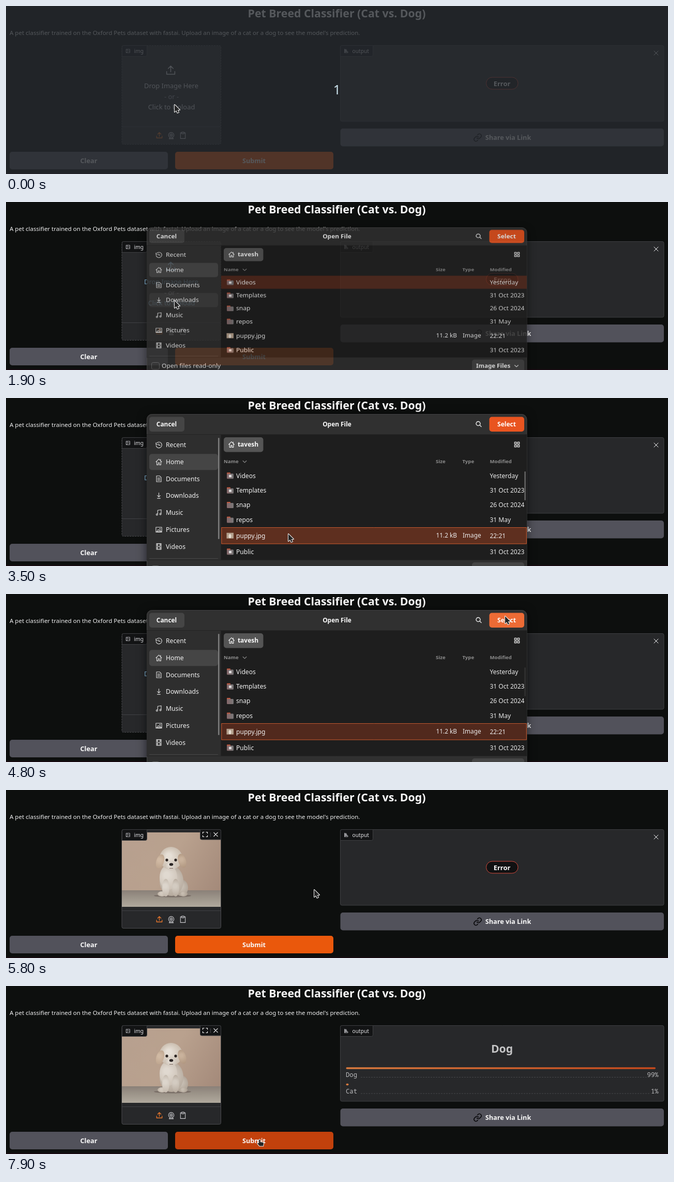
Recreate the animation shown at these times as an HTML page with a canvas. Size 1280 by 325 pixels, loop 8 s.

```html
<!DOCTYPE html>
<html lang="en">
<head>
<meta charset="utf-8">
<title>Pet Breed Classifier</title>
<style>
html, body { margin: 0; width: 100%; height: 100%; overflow: hidden; background: #0d0f0e; }
canvas { display: block; }
</style>
</head>
<body>
<canvas id="stage" width="1280" height="325"></canvas>
<script>
const LOOP = 8000, TICK = 100;
const screen2d = document.getElementById('stage').getContext('2d');
const sheet = document.createElement('canvas');
sheet.width = 1280;
sheet.height = 400;
const sheet2d = sheet.getContext('2d');
let g = screen2d;

const SANS = '"Noto Sans", "Open Sans", sans-serif';
const MONO = '"Noto Sans Mono", "DejaVu Sans Mono", monospace';

// Icons on a 24 unit grid
const ICON = {
  upload: 'M3 15v6h18v-6M12 16V3M6.5 8.5L12 3l5.5 5.5',
  webcam: 'M12 2a9 9 0 1 0 .01 0M12 6.5a4.5 4.5 0 1 0 .01 0M12 10a1 1 0 1 0 .01 0M8 19l-3 4h14l-3-4',
  clipboard: 'M8 4H4v19h16V4h-4M8 2h8v5H8z',
  image: 'M3 3h18v18H3zM8 7a1.6 1.6 0 1 0 .01 0M4 20L15 10l6 6',
  chart: 'M3 2v20M6 4h6v4H6zM6 10h9v4H6zM6 16h14v5H6z',
  close: 'M4 4L20 20M20 4L4 20',
  link: 'M10 13a5 5 0 0 0 7.5.5l3-3a5 5 0 0 0-7-7l-1.8 1.7M14 11a5 5 0 0 0-7.5-.5l-3 3a5 5 0 0 0 7 7l1.7-1.7',
  expand: 'M8 3H3v5M16 3h5v5M21 16v5h-5M8 21H3v-5',
  clock: 'M5 5a10 10 0 1 1-2.5 9M2 4v6h6M12 7v6h5',
  home: 'M2 12L12 2l10 10M5 10v12h5v-7h4v7h5V10M18 7V3',
  page: 'M4 2h11l5 5v15H4zM8 9h8M8 13h8M8 17h8',
  down: 'M12 2v14M7 11l5 5 5-5M7 21h10',
  music: 'M8 18V4l12-2v14M5.5 16a2.6 2.6 0 1 0 .01 0M17.5 14a2.6 2.6 0 1 0 .01 0',
  picture: 'M2 4h20v17H2zM5 19l5-7 3 4 3-3 4 6zM16 7.5a1 1 0 1 0 .01 0',
  film: 'M4 2h16v20H4zM8 2v20M16 2v20M8 12h8M4 7h4M4 17h4M16 7h4M16 17h4',
  search: 'M10 2a8 8 0 1 0 .01 0M16 16l6 6',
  grid: 'M3 3h7v7H3zM14 3h7v7h-7zM3 14h7v7H3zM14 14h7v7h-7z',
  chevron: 'M3 8l9 9 9-9'
};
for (const name in ICON) ICON[name] = new Path2D(ICON[name]);

const ARROW = new Path2D('M0 0V14L3.2 11L5.5 15.8L8 14.7L5.8 9.9H10Z');
const HAND = new Path2D('M1 2Q2.3.2 3.6 2V5.8L8.8 6.7Q10.2 7 10 8.8L9.2 13.6H2.3L-2 8.5Q-1.6 7 1 8.2Z');

const SIDEBAR = [['Recent', 'clock'], ['Home', 'home'], ['Documents', 'page'],
  ['Downloads', 'down'], ['Music', 'music'], ['Pictures', 'picture'], ['Videos', 'film']];
const FILES = [['Videos', 'Yesterday'], ['Templates', '31 Oct 2023'], ['snap', '26 Oct 2024'],
  ['repos', '31 May'], ['puppy.jpg', '22:21'], ['Public', '31 Oct 2023']];
const ROW_EDGE = [136, 164.5, 193, 221, 250, 282.5, 312];
const PUPPY = 4;

// Pointer path: time, x, y
const PATH = [[2300, 326, 191], [3200, 548, 261], [3300, 546, 263], [3800, 546, 263],
  [4700, 963, 47], [4800, 965, 43], [5600, 965, 43], [5700, 790, 110], [5800, 596, 193],
  [5900, 595, 195], [6100, 595, 195], [6700, 488, 296]];

function pointerAt(t) {
  const next = PATH.findIndex(p => p[0] > t);
  if (next === 0) return PATH[0].slice(1);
  if (next < 0) return PATH[PATH.length - 1].slice(1);
  const a = PATH[next - 1], b = PATH[next];
  let k = (t - a[0]) / (b[0] - a[0]);
  if (b[0] - a[0] > 400) k = k * k * (3 - 2 * k);
  return [a[1] + (b[1] - a[1]) * k, a[2] + (b[2] - a[2]) * k];
}

function rect(x, y, w, h, fill) {
  g.fillStyle = fill;
  g.fillRect(x, y, w, h);
}

function box(x, y, w, h, r, fill, stroke, dash = []) {
  g.beginPath();
  g.roundRect(x, y, w, h, r);
  if (fill) { g.fillStyle = fill; g.fill(); }
  if (stroke) {
    g.strokeStyle = stroke;
    g.lineWidth = 1;
    g.setLineDash(dash);
    g.stroke();
    g.setLineDash([]);
  }
}

function line(x1, y1, x2, y2, color, dash = []) {
  g.beginPath();
  g.moveTo(x1, y1);
  g.lineTo(x2, y2);
  g.strokeStyle = color;
  g.lineWidth = 1;
  g.setLineDash(dash);
  g.stroke();
  g.setLineDash([]);
}

// y is the middle of the capital letters
function text(s, x, y, size, color, { weight = 400, align = 'left', family = SANS } = {}) {
  g.font = `${weight} ${size}px ${family}`;
  g.textAlign = align;
  g.fillStyle = color;
  g.fillText(s, x, y + size * 0.357);
}

const bold = (s, x, y, size, color, align = 'center') => text(s, x, y, size, color, { weight: 700, align });

function icon(name, x, y, size, color, weight = 1.1) {
  const k = size / 24;
  g.save();
  g.translate(x - size / 2, y - size / 2);
  g.scale(k, k);
  g.strokeStyle = color;
  g.lineWidth = weight / k;
  g.lineCap = g.lineJoin = 'round';
  g.stroke(ICON[name]);
  g.restore();
}

function oval(x, y, rx, ry, fill, turn = 0) {
  g.beginPath();
  g.ellipse(x, y, rx, ry, turn, 0, Math.PI * 2);
  g.fillStyle = fill;
  g.fill();
}

// Oval shaded from a lit spot at its upper left to a darker rim
function fur(x, y, rx, ry, light, dark, turn = 0) {
  const r = Math.max(rx, ry);
  const fill = g.createRadialGradient(x - rx * .25, y - ry * .25, 0, x, y, r * 1.05);
  fill.addColorStop(.2, light);
  fill.addColorStop(1, dark);
  oval(x, y, rx, ry, fill, turn);
}

function gradient(x1, y1, x2, y2, ...colors) {
  const fill = g.createLinearGradient(x1, y1, x2, y2);
  colors.forEach((c, i) => fill.addColorStop(i / (colors.length - 1), c));
  return fill;
}

function chip(x, w, name, label) {
  box(x + .5, 76.5, w, 21, [3, 0, 3, 0], '#131415', '#3f4043');
  icon(name, x + 12, 87, 9, '#bcbcc0', .9);
  text(label, x + 23.5, 87, 10.2, '#e4e4e7');
}

function drawPhoto() {
  rect(224, 82, 191, 144, gradient(224, 82, 415, 190, '#b7a08f', '#b9a18e', '#a48a7a'));
  rect(224, 194, 191, 32, gradient(0, 194, 0, 226, '#8a8078', '#9e968b', '#b0a99d'));
  oval(322, 204.5, 36, 3, '#7b7068');
  fur(339, 189, 13, 16, '#cbc2b7', '#ab9f92');
  fur(320, 176, 23, 29, '#d6cec4', '#b3a79a');
  fur(314, 169, 17, 24, '#e0d9d0', '#cbc0b4');
  fur(302, 201, 9, 5, '#d3cabf', '#b9ad9f');
  fur(343, 201, 8, 5, '#c6bcb0', '#a99d90');
  fur(309, 189, 7, 17, '#dcd5cc', '#c3b8ac');
  fur(328, 189, 7, 17, '#d3cbc1', '#b6aa9d');
  fur(319, 132, 22, 22, '#e6dfd6', '#c9bcad');
  fur(298, 138, 7.5, 14, '#d0b9a3', '#bda48d', .3);
  fur(340.5, 137, 7.5, 14, '#c9b29c', '#b0967f', -.3);
  fur(319, 146, 11, 9, '#e4ddd4', '#cbc1b5');
  oval(311, 135.5, 2.6, 2.7, '#2c2522');
  oval(328, 135.5, 2.6, 2.7, '#2c2522');
  oval(319.5, 144, 3.8, 2.8, '#2b2524');
  line(316, 151.5, 323, 151.5, '#7a675f');
}

function drawImagePanel(t) {
  const loaded = t >= 5700;
  box(224, 76.5, 191.5, 191, 3, '#27282a', '#4a4b4e', loaded ? [] : [3, 2]);
  line(224, 233.5, 415, 233.5, '#404144');
  if (loaded) {
    drawPhoto();
    box(375.5, 76.5, 40, 19.5, [0, 3, 0, 3], '#131415', '#3f4043');
    icon('expand', 385, 86, 12, '#f4f4f5', 1.2);
    line(395.5, 82, 395.5, 91, '#45464a');
    icon('close', 405.5, 86, 11, '#f4f4f5', 1.2);
  } else {
    const color = t >= 1900 && t < 5400 ? '#8ec8ee' : '#e4e4e7';
    icon('upload', 318.5, 124, 21, color, 1.5);
    text('Drop Image Here', 319.5, 154, 12.9, color, { align: 'center' });
    text('- or -', 320, 175, 12.9, '#a1a1aa', { align: 'center' });
    text('Click to Upload', 320, 195.5, 12.9, color, { align: 'center' });
  }
  icon('upload', 296.5, 250, 14, '#e8762c', 1.3);
  icon('webcam', 319.5, 250.5, 14, '#c8c8cc');
  icon('clipboard', 342, 250, 14, '#c8c8cc');
  chip(224, 48, 'image', 'img');
}

function drawScore(label, value, y, right) {
  box(657.5, y - 14.7, right - 657.5, 3.4, 1.7, gradient(658, 0, 1256, 0, '#d97a3e', '#c5491c'));
  text(label, 657, y, 12.2, '#bcbcbe', { family: MONO });
  text(value, 1261.5, y, 12.2, '#bcbcbe', { family: MONO, align: 'right' });
  line(686, y + 4.5, 1261 - value.length * 7.4, y + 4.5, '#46474a', [3, 2]);
}

function drawOutputPanel(t) {
  box(646.5, 76.5, 625.5, 146.5, 3, '#27282a', '#3f4043');
  chip(646, 63, 'chart', 'output');
  if (t < 7200) {
    icon('close', 1257, 91, 12, '#f4f4f5', 1);
    box(928.5, 138, 61.5, 23, 11.5, '#101112', '#d24a3c');
    bold('Error', 959, 150, 12.9, '#fafafa');
    return;
  }
  g.globalAlpha = Math.min(1, (t - 7100) / 800);
  bold('Dog', 959, 121.5, 21.2, '#c4c4c5');
  drawScore('Dog', '99%', 172, 1256);
  drawScore('Cat', '1%', 203.5, 662.5);
  g.globalAlpha = 1;
}

function drawPage(t, overSubmit) {
  rect(0, 0, 1280, 325, '#0d0f0e');
  rect(0, 323, 1280, 2, '#170b11');
  bold('Pet Breed Classifier (Cat vs. Dog)', 639.5, 14, 21.3, '#fafafa');
  text("A pet classifier trained on the Oxford Pets dataset with fastai. Upload an image of a cat or a dog to see the model's prediction.",
    7, 51.5, 11.5, '#f0f0f1');
  drawImagePanel(t);
  drawOutputPanel(t);
  box(646.5, 237, 625.5, 34.5, 5, '#52525b');
  icon('link', 912, 254.5, 18, '#09090b', 1.6);
  bold('Share via Link', 971, 254.5, 12.7, '#fafafa');
  box(7, 282, 306, 34, 5, '#52525b');
  bold('Clear', 160, 299.5, 12.8, '#fafafa');
  box(327, 282, 306, 34, 5, overSubmit ? '#c2410c' : '#ea580c');
  bold('Submit', 479.5, 299.5, 12.7, '#fafafa');
}

function drawFolder(index, y) {
  if (index === PUPPY) {
    rect(426.5, y - 5.5, 13.5, 11, '#b39f8c');
    oval(433, y + 1, 2.5, 4, '#e6ddd2');
    return;
  }
  box(427, y - 6, 7, 5, 1, '#c2583f');
  box(427, y - 4, 13, 10, 1.5, gradient(427, 0, 440, 0, '#85686a', '#777677'));
  if (index < 2 || index === 5) rect(431, y - 1.5, 5, 4.5, '#dedede');
}

function drawSidebar(t, hovered) {
  rect(272, 71, 143.5, 242, '#2e2e2e');
  SIDEBAR.forEach(([label, name], i) => {
    const y = 91 + i * 32.7;
    if (i === 1) box(277, y - 15.5, 133, 31, 5, '#454545');
    else if (i === hovered) box(277, y - 15.5, 133, 31, 5, '#3a3a3a');
    icon(name, 295.5, y, 13.5, '#dcdcdc');
    text(label, 309, y, 12.2, '#f2f2f2');
  });
  line(277, 310.5, 410, 310.5, '#484848');
  if (t >= 2200) box(410, 77, 2.6, 196, 1.3, '#7b7b7b');
  line(415.5, 71, 415.5, 313, '#262626');
}

function drawFiles(t, x, y) {
  const selected = t < 3400 ? 0 : PUPPY;
  const inList = x > 416 && x < 1007 && y > ROW_EDGE[0];
  FILES.forEach(([name, date], i) => {
    const top = ROW_EDGE[i], height = ROW_EDGE[i + 1] - top, mid = top + height / 2;
    const hover = inList && y >= top && y < top + height;
    if (i === selected) rect(416, top, 591, height, hover ? '#5e2f1f' : '#51291d');
    else if (hover) rect(416, top, 591, height, '#2b2b2b');
    if (i === selected && i === PUPPY) box(416.8, top + .5, 589.5, height - 1, 0, null, '#c1582f');
    drawFolder(i, mid);
    text(name, 445, mid, 12.1, '#f2f2f2');
    text(date, 935.5, mid, 12, '#ececec');
    if (i === PUPPY) {
      text('11.2 kB', 872, mid, 11.8, '#ececec', { align: 'right' });
      text('Image', 883, mid, 11.8, '#ececec');
    }
  });
  if (x > 416) box(1002.5, 142, 2.2, 56, 1.1, t < 4500 ? '#6f6f6f' : '#353535');
}

function drawDialog(t, x, y) {
  const onSelect = x > 934 && y < 65;
  g.clearRect(0, 0, 1280, 400);
  g.save();
  g.shadowColor = 'rgba(0,0,0,.6)';
  g.shadowBlur = 18;
  g.shadowOffsetY = 3;
  box(272, 31, 735, 330, 10, '#303030');
  g.restore();
  box(272.5, 31.5, 734.5, 329.5, 10, null, '#434343');
  rect(415, 71, 592, 242, '#1e1e1e');
  line(272, 70.5, 1007, 70.5, '#242424');

  box(277, 36.5, 68, 28.5, 5, '#454545');
  bold('Cancel', 310.5, 50.5, 11.9, '#fafafa');
  bold('Open File', 640, 50.5, 11.9, '#fafafa');
  icon('search', 914, 50.5, 12, '#eee', 1.3);
  box(934.5, 36.5, 67.5, 28.5, 5, t >= 5000 ? '#d24b1b' : onSelect ? '#ed6b35' : '#e95420');
  bold('Select', 968, 50.5, 12, '#fff');

  drawSidebar(t, x < 416 ? 3 : -1);
  box(421, 76, 76.5, 28.5, 5, '#555');
  icon('home', 436, 90, 13, '#f2f2f2');
  bold('tavesh', 468, 90, 12, '#fafafa');
  icon('grid', 988, 90, 12.5, '#eee', 1.2);
  [['Name', 421], ['Size', 831], ['Type', 882.5], ['Modified', 935.5]].forEach(
    ([label, left]) => bold(label, left, 122.5, 9.6, '#8d8d8d', 'left'));
  icon('chevron', 461.5, 123, 9, '#8d8d8d');
  drawFiles(t, x, y);

  line(272, 313.5, 1007, 313.5, '#262626');
  box(281.5, 324.5, 15, 15, 3, '#333', '#666');
  text('Open files read-only', 301, 332, 12.1, '#f2f2f2');
  box(901, 318, 101, 29, 5, '#454545');
  bold('Image Files', 909, 332, 11.6, '#fafafa', 'left');
  icon('chevron', 987, 332, 9, '#eee', 1.2);
}

function drawPointer(x, y, hand) {
  g.save();
  g.translate(x, y);
  g.lineJoin = 'round';
  g.lineWidth = 2;
  g.strokeStyle = '#f4f4f4';
  g.fillStyle = '#262626';
  const shape = hand ? HAND : ARROW;
  g.stroke(shape);
  g.fill(shape);
  g.restore();
}

function draw(t) {
  const [x, y] = pointerAt(t);
  const overSubmit = t > 6000 && y > 282;
  g = screen2d;
  drawPage(t, overSubmit);

  if (t >= 1900 && t < 5300) {
    g = sheet2d;
    drawDialog(t, x, y);
    g = screen2d;
    const moving = t === 1900 || t === 5200;
    const squash = moving ? .891 : 1;
    g.globalAlpha = moving ? .84 : 1;
    g.drawImage(sheet, 0, 196 * (1 - squash), 1280, 400 * squash);
    g.globalAlpha = 1;
  }

  if (t < 500) {
    rect(0, 0, 1280, 325, 'rgba(39,43,48,.78)');
    text('1', 640, 162.5, 25, '#cfe6f0', { weight: 300, align: 'center' });
  }
  drawPointer(x, y, overSubmit || (t >= 500 && t < 1900));
}

const start = performance.now();
function frame() {
  const elapsed = (performance.now() - start) % LOOP;
  draw(Math.floor(elapsed / TICK) * TICK);
  requestAnimationFrame(frame);
}
frame();
</script>
</body>
</html>
```
